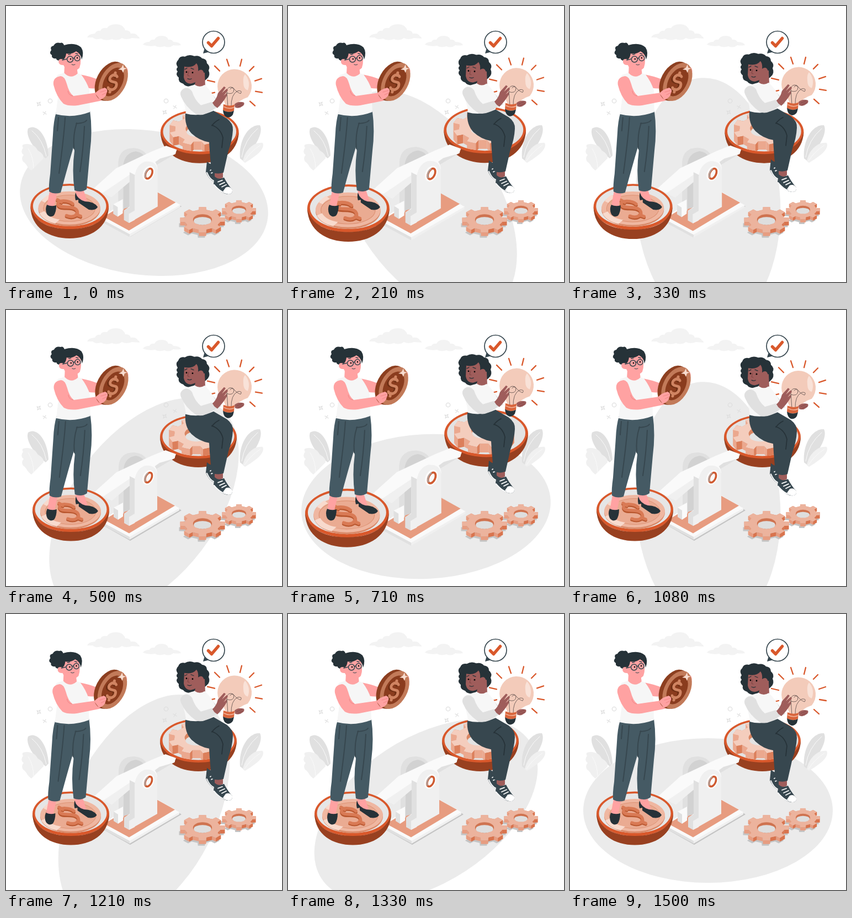
These frames come from a looping animation (500 by 500 pixels, 1.54 s). An HTML page:

```html
<!DOCTYPE html>
<html lang="en">
<head>
<meta charset="utf-8">
<title>Balance of money and ideas</title>
<style>
html, body { margin: 0; height: 100%; overflow: hidden; background: #fff; }
svg { display: block; width: 100vw; height: 100vh; }
.line { fill: none; stroke-linecap: round; stroke-linejoin: round; }
.skinA { fill: #ffa2a2; } .skinB { fill: #9f5d5b; }
.hair { fill: #263238; } .dark { fill: #37474f; }
.orange { fill: #d9582b; } .bowl { fill: #984020; }
.pale { fill: #f0f0f0; } .grey { fill: #e0e0e0; } .white { fill: #fafafa; }
</style>
</head>
<body>
<svg viewBox="0 0 500 500">
  <ellipse id="floor" cx="250" cy="356" rx="226" ry="131" fill="#ebebeb"/>

  <g fill="#f3f3f3">
    <path d="M147 57q2-6 14-7q3-6 10-5q2-6 12-5q5-8 18-7q12 1 15 11q8-1 10 6q10-1 13 5q3 1 3 4l-14-1q-10 4-18 0q-8 6-18 2q-12 4-20-1q-10 3-15-2z"/>
    <path d="M248 70q3-5 12-5q2-5 9-4q3-7 13-7q10 0 12 7q6-1 9 4q12 0 14 6q-8 1-14 0q-7 6-16 2q-11 3-17-1q-12 2-22-2z"/>
  </g>

  <path class="grey" d="M72 276C49 259 35 235 40 222C54 212 75 232 77 271z"/>
  <path class="pale" d="M46 298C36 291 39 287 31 282Q27 275 32 270Q25 264 31 257Q26 249 40 250Q52 251 58 262Q69 268 68 276z"/>
  <path class="grey" d="M424 276C421 244 439 214 460 216C467 229 452 256 429 280z"/>
  <path class="pale" d="M429 281C432 262 449 245 465 248C470 259 453 272 433 284z"/>
  <path class="line" stroke="#fafafa" d="M47 226Q67 242 73 272M40 258Q50 274 50 294M456 222Q432 242 427 274M461 252Q442 264 432 281"/>
  <g id="sparkles" class="line" stroke="#dedede" stroke-width="1.2"></g>

  <g id="gears"></g>

  <path d="M172 388L225 418L318 363L262 330z" fill="#c4c4c4"/>
  <g id="balance">
    <path class="grey" d="M170 381V387L224 416V410z"/>
    <path class="pale" d="M224 410V416L314 363V358z"/>
    <path class="white" d="M170 382L224 411L314 359L260 328z"/>
    <path d="M178 380L223 404.500L306 354.500L262 330z" fill="#e79c80"/>

    <path class="grey" d="M204 366V283Q206 258 232 258Q252 260 256 275L212 370z"/>
    <path d="M213 366V287Q216 267 235 264Q249 266 252 278V355z" fill="#d2d2d2"/>
    <path class="white" d="M195 358L212 349V374L203 380z"/>
    <path class="grey" d="M195 358L203 363V380L195 375z"/>

    <g>
      <ellipse cx="348.5" cy="230" rx="69.5" ry="40" class="orange"/>
      <path class="bowl" d="M279 230C280 266 312 285 348.5 285S417 266 418 230C412 256 384 269 348.5 269S284 255 279 230z"/>
      <ellipse cx="348.5" cy="229" rx="65" ry="35.5" fill="#e3e3e3"/>
      <clipPath id="dish"><path d="M270 150H430V229H413.500A65 35.500 0 0 1 283.500 229H270z"/></clipPath>
      <g id="dishGear" clip-path="url(#dish)"></g>
    </g>

    <path class="grey" d="M158 342L240 307L306 268L306 262L160 333z"/>
    <path class="white" d="M160 330L200 294L264 264L289 254L308 261L305 269L278 277L234 309L192 345z"/>
    <path class="pale" d="M176 338L234 299V310L192 345z"/>

    <path class="white" d="M214 369L224 362V300Q228 275 250 274Q272 276 274 295L244 360L233 386L223 391z"/>
    <path class="grey" d="M224 301L234 306V371L223 375V391L214 386V369L224 363z"/>
    <path d="M223 375L233 369V309Q236 287 252 282Q272 280 274 298V362L223 391z" fill="#f0f0f0"/>
    <ellipse cx="257.500" cy="303.500" rx="10" ry="14" transform="rotate(25 258 304)" fill="#fcfcfc"/>
    <ellipse cx="258" cy="303.500" rx="5.500" ry="9.500" transform="rotate(25 258 304)" fill="#fafafa" stroke="#cf5a30" stroke-width="3.500"/>
    <path d="M253 311A5.500 9.500 25 0 1 258 295" fill="none" stroke="#a9a9a9" stroke-width="2"/>

    <g>
      <ellipse cx="117.500" cy="362" rx="69.500" ry="40.500" class="orange"/>
      <path class="bowl" d="M48 362C49 400 81 418.500 117.500 418.500S186 400 187 362C181 390 153 402 117.500 402S54 390 48 362z"/>
      <ellipse cx="117.500" cy="361" rx="65" ry="36" fill="#e6e6e6"/>
      <ellipse cx="117" cy="366.500" rx="55" ry="30.500" fill="#d98a6a"/>
      <ellipse cx="117" cy="364.500" rx="55" ry="29.500" fill="#efb7a1"/>
      <ellipse cx="117" cy="365" rx="46" ry="23.500" fill="#eaab92" stroke="#dd9274"/>
      <path d="M64 374Q72 388 92 392L100 385Q80 382 73 370zM68 352Q72 345 80 341L86 346Q78 349 74 355z" fill="#f8dacd"/>
      <g class="line" stroke-width="5.500">
        <path stroke="#b9572f" d="M123 359.500C117 353 95 351 97 360.500C100 370 120 361 129 369.500C137 378 124 385 112 380M103 356L96 352M129 378L137 381"/>
        <path stroke="#d97a55" d="M123 357C117 351 95 349 97 358C100 367 120 359 129 367C137 376 124 383 112 378M103 354L96 350M129 376L137 379"/>
      </g>
    </g>
  </g>

  <g id="investor">
    <path class="skinA" d="M79 335L74 363L80 370L87 363L93 337zM125 332L127 345L142 358L147 354L140 332z"/>
    <path class="hair" d="M74 360Q82 364 91 361Q91 374 86 380Q79 384 74 377Q70 368 74 360zM126 338Q129 350 143 354Q159 354 166 364Q163 371 150 369L131 356V351L126 352Q124 344 126 338z"/>
    <path d="M91 192Q120 202 152 190Q157 226 152 264L146 332Q136 339 124 334Q119 298 124 262L122 256Q112 290 99 338Q87 342 78 336Q77 325 80 304L85 232Q86 208 91 192z" fill="#455a64"/>
    <path class="line" stroke="#37474f" stroke-width="2" d="M127 213Q143 212 146 207M128 212Q121 233 123 258M107 202Q105 236 96 303M142 218Q140 260 134 300M95 202L93 226"/>
    <path class="skinA" d="M134 124Q151 127 166 133L167 149Q150 151 138 145z"/>
    <path class="skinA" d="M106 108H128L130 125Q120 135 105 126z"/>
    <path d="M105 121Q117 134 130 122L136 124Q146 137 151 152L152 192Q121 204 90 196L94 165Q87 140 93 125z" fill="#f6f6f6"/>
    <path class="skinA" d="M99 127Q84 129 86 143Q91 164 104 177Q113 182 130 180L170 172Q186 168 184 151Q171 148 164 157L122 163Q114 157 110 141Q106 127 99 127z"/>
    <path class="line" stroke="#ef8585" d="M112 154Q113 162 121 163"/>

    <path class="skinA" d="M105 86L132 80Q138 98 133 112Q127 119 115 116Q106 113 104 107Q95 108 95 99Q97 94 104 96z"/>
    <path class="hair" d="M105 71Q125 65 136 75Q142 84 137 97Q136 87 127 82Q118 88 109 86Q108 94 104 97Q97 94 95 99Q90 97 91 95Q82 96 83 89Q77 85 82 80Q79 73 86 72Q90 65 98 67Q103 65 105 71z"/>
    <g class="line" stroke="#37474f" stroke-width="1.500">
      <circle cx="116" cy="96.500" r="5.500"/><circle cx="129" cy="94.500" r="5"/>
      <path d="M121 95L124 94M110 96L102 98M113 88L117 87M126 86L130 87"/>
    </g>
    <path class="line" stroke="#37474f" d="M119 106Q122 108 125 106"/>
    <circle cx="117" cy="96" r="1.300"/><circle cx="129" cy="94" r="1.300"/>

    <path class="skinA" d="M207 112Q217 107 220 114Q223 122 215 127z"/>
    <g transform="rotate(28 191 137)">
      <ellipse cx="188.500" cy="137.500" rx="24.500" ry="38" fill="#8c3f20"/>
      <ellipse cx="194" cy="136" rx="23" ry="37" fill="#c27a59"/>
      <ellipse cx="194" cy="136" rx="16.500" ry="28" fill="#8a3c1e"/>
    </g>
    <g class="line" stroke-width="5">
      <path stroke="#6f2f14" d="M198 129C195 122 183 128 185 135C188 141 198 136 197 144C196 153 183 156 182 149"/>
      <path stroke="#d08462" d="M201 128C198 121 186 127 188 134C191 140 201 135 200 143C199 152 186 155 185 148M197 126L198 121M189 151L188 156"/>
    </g>
    <path fill="#f8ddd0" d="M212 106L213.500 112L219 113L214 115L212 121L209.500 116L203 115L209 112z"/>
    <path class="skinA" d="M161 158Q169 150 179 148Q186 151 182 158Q181 166 170 170z"/>
    <path class="line" stroke="#ef8585" d="M171 156L181 153M174 161L182 157"/>
  </g>

  <g id="thinker">
    <g id="rays" class="line" stroke="#d9582b" stroke-width="2.300"></g>
    <path class="grey" d="M354 144Q367 150 379 166L390 181L376 187L353 163z"/>
    <path class="hair" d="M311 111Q306 103 312 98Q315 90 324 92Q332 87 341 91Q350 89 355 95Q364 96 364 104Q371 110 367 117Q371 126 364 132Q359 138 350 137L336 146Q325 147 321 141Q311 138 313 130Q306 124 311 119Q307 115 311 111z"/>
    <path class="skinB" d="M346 121H360L361 145Q351 152 342 143z"/>
    <path class="skinB" d="M323 110Q338 113 345 104Q349 109 348 118Q355 113 358 120Q359 128 350 131Q346 139 335 141Q324 141 322 129z"/>
    <path class="line" stroke="#263238" stroke-width="1.300" d="M324 115L328 113M335 113L340 115M329 132Q333 134 336 132"/>
    <circle cx="327" cy="120" r="1.400"/><circle cx="338" cy="121" r="1.400"/>
    <path class="line" stroke="#7e4140" d="M331 119L329 126L332 127"/>
    <path d="M342 143Q351 149 360 143Q374 157 379 169L374 203Q348 207 326 199Q326 183 318 164Q318 147 342 143z" fill="#f7f7f7"/>

    <path class="dark" d="M364 282Q371 289 379 287L380 309L376 318Q368 315 362 301zM378 308Q386 315 395 311Q401 323 410 333Q411 341 403 341Q390 341 376 323z"/>
    <path class="skinB" d="M378 298H393V311Q385 316 378 309z"/>
    <path fill="#fff" d="M398 329Q405 326 410 333Q411 341 403 341Q398 340 393 336z"/>
    <path class="line" stroke="#fff" stroke-width="1.800" d="M364 302Q369 314 376 317M377 324Q390 340 404 340M384 319L392 316M387 324L396 320M391 328L399 324M370 298L376 295M372 303L378 300"/>
    <path class="dark" d="M325 195Q350 202 376 190L400 204Q412 213 411 225Q410 244 403 262L394 302Q383 306 372 301L369 263L368 247Q350 244 336 231Q323 217 325 195z"/>
    <path class="line" stroke="#263238" stroke-width="1.700" d="M373 216Q389 222 393 239L391 257M373 217Q378 210 386 206"/>

    <path d="M398 181Q397 176 392 167.500A31 31 0 1 1 438 165.500Q421 171 415 182z" fill="#f2c7b5" opacity=".92"/>
    <path d="M433 124Q444 137 438 153Q430 151 430 139Q429 129 433 124z" fill="#f9e2d8"/>
    <path class="line" stroke="#6b5a55" stroke-width=".9" d="M402 184L400 154Q402 145 411 148Q418 157 425 159Q429 153 420 154Q407 160 408 184M400 158Q413 162 413 151Q409 146 406 151"/>
    <path d="M394 178Q404 183 414 179L413 190Q403 195 393 189z" fill="#d9653c"/>
    <path class="line" stroke="#f2b49c" stroke-width="1.500" d="M395 183Q404 188 413 184"/>
    <path class="hair" d="M393 189Q403 195 413 190L411 197Q407 203 401 202Q394 200 393 189z"/>
    <path class="skinB" d="M414 178Q421 172 431 175Q433 179 428 182Q422 187 415 184z"/>
    <path class="skinB" d="M372 177Q381 171 384 158L395 146L398 148L391 158L400 150L402 153L394 163L400 158V163Q393 175 383 185z"/>
    <path class="line" stroke="#824746" d="M418 180L428 176M420 183L429 179"/>
    <path class="grey" d="M324 149Q313 154 317 164Q325 183 344 196Q358 202 380 185L373 174L353 180Q342 171 337 155Q332 148 324 149z"/>
  </g>

  <path class="dark" d="M360 76L357 86L369 83z"/>
  <circle cx="376" cy="65.500" r="20" fill="#fff" stroke="#37474f" stroke-width="1.700"/>
  <path class="line" stroke="#d9582b" stroke-width="5.500" d="M366.500 66.500L372.500 72.500L384.500 58.500"/>
</svg>
<script>
const LOOP = 1540, STEPS = 37;
const $ = id => document.getElementById(id);
const poly = (points, fill) =>
  `<polygon points="${points.map(p => p.map(v => v.toFixed(1))).join(' ')}" fill="${fill}"/>`;

// Flat gear seen from above at an angle, with extruded sides
function gear(cx, cy, r, teeth, height, turn, colors, shadow) {
  const [top, left, right, hole] = colors, ry = r * 0.56, rim = [];
  for (let i = 0; i < teeth; i++)
    for (const [offset, k] of [[-.27, .79], [-.2, 1], [.2, 1], [.27, .79]]) {
      const a = (i + offset) / teeth * 2 * Math.PI + turn;
      rim.push([cx + r * k * Math.cos(a), cy + ry * k * Math.sin(a)]);
    }
  const down = ([x, y]) => [x, y + height];
  const walls = rim.map((p, i) => [p, rim[(i + 1) % rim.length]])
    .sort((a, b) => a[0][1] + a[1][1] - b[0][1] - b[1][1])
    .map(([p, q]) => poly([p, q, down(q), down(p)], q[1] > p[1] ? right : left));
  const hx = r * .42, hy = ry * .42;
  return (shadow ? poly(rim.map(([x, y]) => [x - 2, y + height + 3]), '#c4c4c4') : '') +
    walls.join('') + poly(rim, top) +
    `<ellipse cx="${cx}" cy="${cy}" rx="${hx}" ry="${hy}" fill="${hole}"/>` +
    `<ellipse cx="${cx}" cy="${cy + height * .35}" rx="${hx * .92}" ry="${hy * .75}" fill="${shadow ? '#dedede' : '#e3e3e3'}"/>`;
}

const floorColors = ['#ecb39d', '#e79d81', '#d9744e', '#cf7350'];
$('gears').innerHTML = gear(422, 369, 31, 8, 6, 0, floorColors, true) +
  gear(356, 387, 41, 8, 7, 0, floorColors, true);
$('dishGear').innerHTML =
  gear(345, 224, 51, 8, 15, Math.PI / 8, ['#f4cdbd', '#eba88e', '#dc7f5b', '#d98562'], false);

$('sparkles').innerHTML = [[60, 178, 80, 172, 70, 194], [288, 193, 290, 172, 306, 183]]
  .map(([sx, sy, cx, cy, x, y]) =>
    `<path d="M${sx - 4} ${sy - 3}l3 1l3-2l-1 3l2 3l-3-1l-3 2l1-3z"/>` +
    `<circle cx="${cx}" cy="${cy}" r="3.700"/>` +
    `<path d="M${x - 3} ${y - 2}l6 4m-5 1l4-6"/>`).join('');

$('rays').innerHTML = [
  [365, 135, 378, 138], [378, 109, 387, 118], [400, 97, 404, 109], [427, 97, 424, 109],
  [449, 110, 441, 118], [463, 132, 451, 136], [464, 157, 452, 155], [451, 181, 442, 173],
  [366, 160, 378, 157]
].map(([x, y, u, v]) => `<path d="M${x} ${y}L${u} ${v}"/>`).join('');

// Linear interpolation through [position, value] pairs
function along(keys, p) {
  const i = Math.max(1, keys.findIndex(k => k[0] >= p));
  const [a, u] = keys[i - 1], [b, v] = keys[i];
  return u + (v - u) * (p - a) / (b - a);
}

const beat = [[0, 1], [.1, 1.1], [.3, 1], [.4, 1], [.5, 1.1], [.6, 1], [1, 1]];
const sway = [[0, 0], [.16, .8], [.36, .8], [.5, -3.3], [.75, -2], [.91, -1], [1, 0]];
const rise = [[0, 0], [.16, -2.5], [.5, -9.3], [1, 0]];

function draw(now) {
  const step = Math.floor(now % LOOP / LOOP * STEPS + .1) % STEPS;
  const p = Math.min(1, (step * LOOP / STEPS + 30) / 1500);
  $('floor').setAttribute('transform', `rotate(${360 * p} 250 356)`);
  $('balance').setAttribute('transform', `translate(233 297) scale(${along(beat, p)}) translate(-233 -297)`);
  $('investor').setAttribute('transform', `translate(${along(sway, p)} 0)`);
  $('thinker').setAttribute('transform', `translate(0 ${along(rise, p)})`);
}

const start = performance.now();
function tick() {
  draw(performance.now() - start);
  requestAnimationFrame(tick);
}
tick();
</script>
</body>
</html>
```
